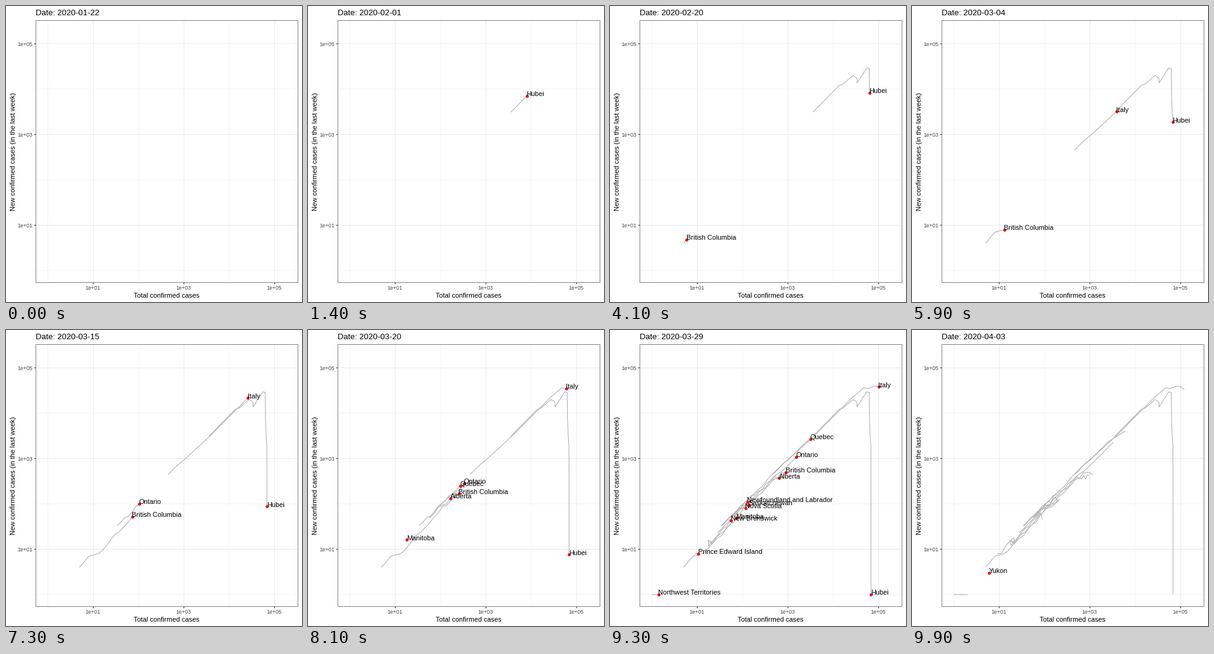
These frames come from a looping animation (480x480 px, 10 s). A matplotlib script:

```python
import numpy as np
import matplotlib.pyplot as plt
from matplotlib.animation import FuncAnimation
from matplotlib.patches import Rectangle

plt.rcParams["font.family"] = "Liberation Sans"
plt.rcParams["path.snap"] = False

SIZE, DPI = 480, 72
FRAMES, LAST_DAY = 100, 72
LAST = FRAMES - 1
START = np.datetime64("2020-01-22")
LEFT, RIGHT, TOP, BOTTOM = 48.5, 473.5, 23.5, 448.5
DECADE = 73.55
INK, TICK_TEXT, GRID, TRAIL = "#333333", "#4d4d4d", "#ebebeb", "#b0b0b0"

rng = np.random.default_rng(4)
fig = plt.figure(figsize=(SIZE / DPI, SIZE / DPI), dpi=DPI, facecolor="white")
ax = fig.add_axes([0, 0, 1, 1])
ax.set_xlim(0, SIZE)
ax.set_ylim(SIZE, 0)
ax.axis("off")


def px(log_total):
    return 67.9 + DECADE * log_total


def py(log_new):
    return 429.05 - DECADE * log_new


def seg(xs, ys, color, width, z):
    ax.plot(xs, ys, color=color, lw=width, zorder=z, solid_capstyle="butt")


def draw_panel():
    for k in range(6):
        major = k % 2
        width = 1.07 if major else 0.53
        seg([px(k)] * 2, [TOP, BOTTOM], GRID, width, 1 + major * 0.1)
        seg([LEFT, RIGHT], [py(k)] * 2, GRID, width, 1 + major * 0.1)
        if major:
            label = f"1e+0{k}"
            seg([px(k)] * 2, [BOTTOM, BOTTOM + 2.75], INK, 1.07, 2)
            seg([LEFT - 2.75, LEFT], [py(k)] * 2, INK, 1.07, 2)
            style = dict(size=8.8, color=TICK_TEXT)
            ax.text(px(k) - 0.6, 460.3, label, ha="center", **style)
            ax.text(43.5, py(k) + 3.4, label, ha="right", **style)
    ax.add_patch(Rectangle((LEFT, TOP), RIGHT - LEFT, BOTTOM - TOP,
                           fill=False, ec=INK, lw=0.6, zorder=6))
    ax.text(260.4, 473.2, "Total confirmed cases", size=11, ha="center")
    ax.text(17, 236, "New confirmed cases (in the last week)", size=11,
            rotation=90, ha="right", va="center")


class Region:
    """A trail through (day, total, new) knots, log-linear in between."""

    def __init__(self, name, *knots):
        at, total, new = np.array(knots, float).T
        days = np.arange(at[0], at[-1] + 1)
        log_total = np.interp(days, at, np.log10(total))
        log_new = np.interp(days, at, np.log10(new))
        # Mid-sized counts are reported unevenly between the knots.
        uneven = ~np.isin(days, at) & (log_total > 1.1) & (log_total < 3)
        log_new += uneven * rng.normal(0, 0.025, len(days))
        log_new = np.minimum(log_new, log_total)

        self.key = np.round(days * LAST / LAST_DAY)
        self.x, self.y = px(log_total), py(log_new)
        self.line, = ax.plot([], [], color=TRAIL, lw=1.07, zorder=3,
                             solid_capstyle="butt", solid_joinstyle="round")
        self.dot, = ax.plot([], [], "o", color="red", ms=4.9, mew=0, zorder=4)
        self.label = ax.text(0, 0, name, size=11, zorder=5)

    def show(self, n):
        alive = n >= self.key[0]
        # Finished trails lose their marker at the very end.
        marked = alive and (n < LAST or len(self.key) == 1)
        self.line.set_visible(alive)
        self.dot.set_visible(marked)
        self.label.set_visible(marked)
        tip_x = np.interp(n, self.key, self.x)
        tip_y = np.interp(n, self.key, self.y)
        done = self.key <= n
        self.line.set_data(np.append(self.x[done], tip_x),
                           np.append(self.y[done], tip_y))
        self.dot.set_data([tip_x], [tip_y])
        self.label.set_position((tip_x - 0.5, tip_y + 0.3))


draw_panel()
title = ax.text(47.8, 15.1, "", size=13.2)

regions = [
    Region("Alberta", (54, 56, 49), (64, 486, 367), (68, 660, 360),
           (72, 969, 427)),
    Region("British Columbia", (26, 5, 4), (38, 8, 7), (43, 13, 8),
           (53, 73, 52), (64, 725, 494), (72, 1174, 449)),
    Region("Hubei", (7, 3554, 3110), (12, 13500, 12100), (13, 16700, 13100),
           (17, 27100, 19900), (19, 31700, 18200), (20, 33400, 16700),
           (21, 33400, 13700), (23, 54400, 29400), (28, 62000, 28600),
           (30, 62700, 8260), (35, 65200, 3160), (43, 67500, 1870),
           (53, 67800, 87), (64, 67800, 1), (72, 67800, 1)),
    Region("Italy", (35, 453, 450), (43, 3860, 3200), (53, 25500, 21500),
           (57, 47000, 36300), (59, 58500, 34700), (64, 80600, 39550),
           (67, 97700, 38550), (72, 119800, 33300)),
    Region("Manitoba", (59, 18, 16), (62, 21, 13), (64, 36, 21),
           (72, 182, 143)),
    Region("New Brunswick", (60, 17, 16), (62, 18, 12), (64, 33, 25),
           (70, 81, 63), (72, 91, 46)),
    Region("Newfoundland and Labrador", (62, 35, 32), (64, 82, 79),
           (70, 175, 140), (72, 195, 113)),
    Region("Northwest Territories", (66, 1, 1), (69, 2, 1), (72, 2, 1)),
    Region("Nova Scotia", (60, 28, 23), (64, 73, 59), (72, 207, 117)),
    Region("Ontario", (47, 34, 33), (53, 104, 101), (64, 858, 601),
           (72, 3255, 2261)),
    Region("Prince Edward Island", (65, 9, 8), (68, 11, 8), (70, 21, 18),
           (72, 22, 13)),
    Region("Quebec", (56, 94, 90), (64, 1632, 1511), (66, 2500, 2320),
           (72, 6100, 4080)),
    Region("Saskatchewan", (60, 52, 50), (64, 95, 79), (72, 220, 125)),
    Region("Yukon", (72, 6, 3)),
]


def update(n):
    title.set_text(f"Date: {START + n * LAST_DAY // LAST}")
    for region in regions:
        region.show(n)
    return []


anim = FuncAnimation(fig, update, frames=FRAMES, interval=100,
                     init_func=lambda: update(0), repeat=True, repeat_delay=0)
plt.show()
```
